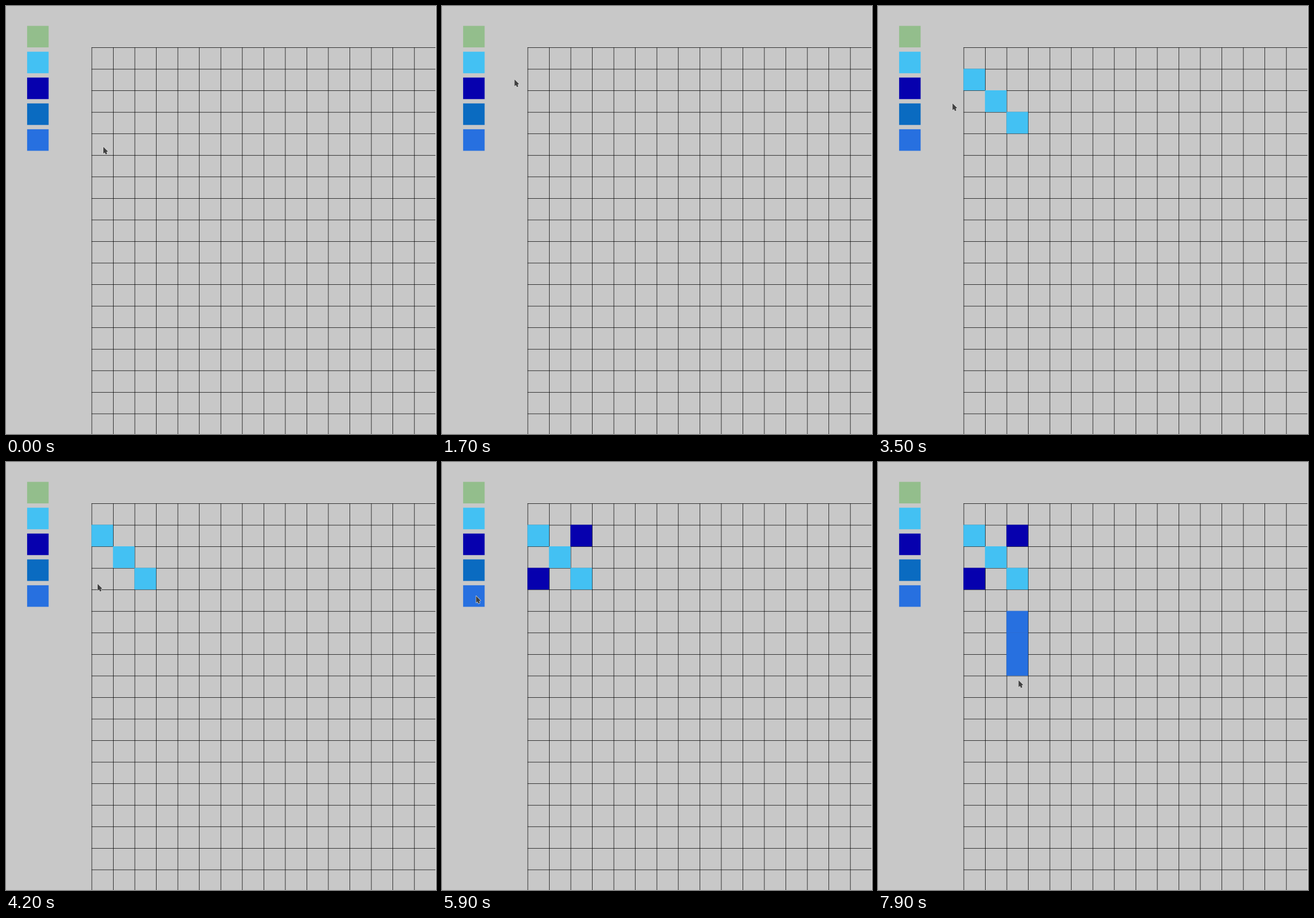
Animation of 751x746 px, one loop 8 s. Source, as an HTML page:

```html
<!DOCTYPE html>
<html lang="en">
<head>
<meta charset="utf-8">
<title>Pixel painter</title>
<style>
  html, body { margin: 0; width: 100%; height: 100%; overflow: hidden; background: #c8c8c8; }
  svg { display: block; }
</style>
</head>
<body>
<svg width="751" height="746" viewBox="0 0 751 746">
  <rect width="751" height="746" fill="#c8c8c8"/>
  <g id="board" transform="translate(-.65 -2.95) scale(.751)"></g>
  <rect x="750" width="1" height="746" fill="#dedede"/>
  <path id="cursor" d="M1 1.5V13.2L3.6 11.3L5.1 14.8L7.6 13.7L6.3 10.5L9 9.5Z" fill="#404040"
        stroke="#e0e0e0" stroke-width="1.3" stroke-linejoin="round" paint-order="stroke"/>
</svg>
<script>
const LOOP = 8000, STEP = 100;
const CELL = 50, LEFT = 200, TOP = 100; // board units
const GREEN = '#93be8c', SKY = '#43c1f3', NAVY = '#0600ae', OCEAN = '#0a6bc1', BLUE = '#2770e0';
const board = document.getElementById('board');
const cursor = document.getElementById('cursor');

function rect(x, y, width, height, fill) {
  const el = document.createElementNS('http://www.w3.org/2000/svg', 'rect');
  const attrs = { x, y, width, height, fill };
  for (const name in attrs) el.setAttribute(name, attrs[name]);
  return board.appendChild(el);
}

[GREEN, SKY, NAVY, OCEAN, BLUE].forEach((color, i) => rect(50, 50 + 60 * i, CELL, CELL, color));
for (let i = 0; i < 18; i++) {
  if (i < 16) rect(LEFT + CELL * i, TOP, 1, 900, '#000');
  rect(LEFT, TOP + CELL * i, 800, 1, '#000');
}

const smooth = p => p * p * (3 - 2 * p);
const brake = p => 1 - (1 - p) ** 2.5;
const cells = [], moves = [];

function paint(time, col, row, color) {
  // A slight bleed hides the antialiased grid line under the top and left edges
  const bleed = .4, size = CELL + bleed;
  const el = rect(LEFT + CELL * col - bleed, TOP + CELL * row - bleed, size, size, color);
  cells.push({ time, el });
}

function move(start, end, x, y, ease = smooth) {
  moves.push({ start, end, x, y, ease });
}

// Pick sky blue, paint a diagonal
move(0, 200, 176, 238);
move(600, 1500, 67, 103);
move(1600, 1900, 159, 140, brake);
paint(2200, 0, 1, SKY);
move(2200, 2400, 207, 149);
move(2500, 2700, 203, 159);
paint(2900, 1, 2, SKY);
move(2800, 2900, 230, 167);
move(2900, 3100, 242, 198);
paint(3200, 2, 3, SKY);

// Pick navy, paint the other two corners
move(3100, 3800, 56, 149);
move(3900, 4200, 159, 211);
paint(4400, 0, 3, NAVY);
move(4200, 4800, 228, 131);
paint(4900, 2, 1, NAVY);

// Pick blue, overshoot a little, paint a column downwards
move(4800, 5900, 58.5, 232);
move(6000, 6600, 267, 289);
move(6600, 6900, 246, 281);
for (let i = 0; i < 3; i++) {
  const time = 7000 + 400 * i;
  paint(time, 2, 5 + i, BLUE);
  move(time, time + (i < 2 ? 200 : 100), 248 - 1.75 * i, 309.5 + 34.75 * i);
}

function pointer(t) {
  let x = 169, y = 244;
  for (const m of moves) {
    if (t <= m.start) break;
    const p = m.ease(Math.min(1, (t - m.start) / (m.end - m.start)));
    x += (m.x - x) * p;
    y += (m.y - y) * p;
  }
  return [x, y];
}

function draw(ms) {
  const t = Math.floor(ms % LOOP / STEP) * STEP;
  for (const { time, el } of cells) el.setAttribute('visibility', t >= time ? 'visible' : 'hidden');
  cursor.setAttribute('transform', `translate(${pointer(t)})`);
}

const begin = performance.now();
function tick() {
  draw(performance.now() - begin);
  requestAnimationFrame(tick);
}
tick();
</script>
</body>
</html>
```
